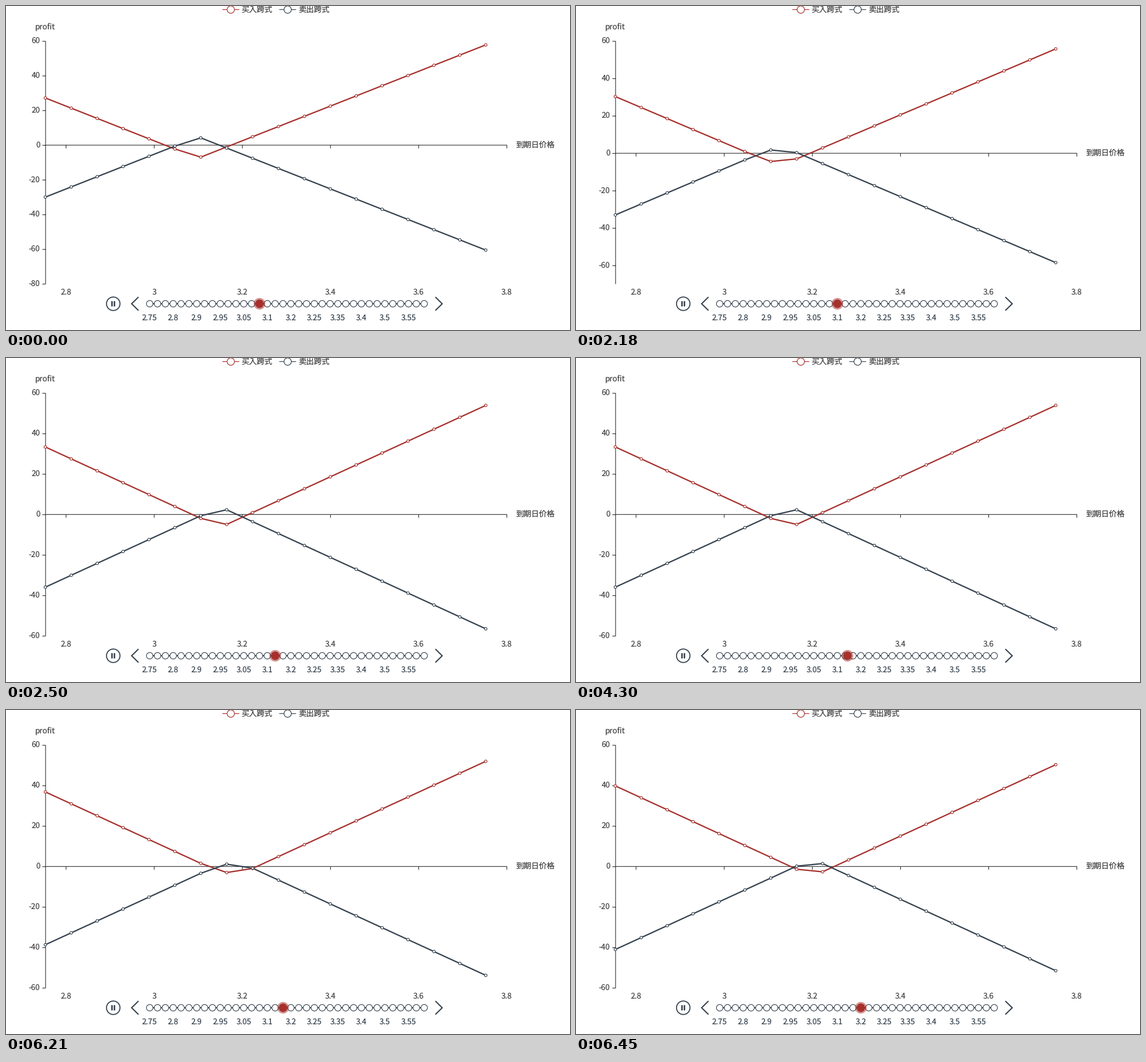
A matplotlib script for the animation above (8 s loop, 986 by 568 pixels).

```python
import numpy as np
import matplotlib.pyplot as plt
from matplotlib.animation import FuncAnimation
from matplotlib.patches import Circle

W, H, DPI = 986, 568, 64
PT = 72 / DPI                      # points per pixel
LOOP, STEP = 8000, 20              # ms
RED, NAVY, GREY, TEXT = "#a6302c", "#36424f", "#333333", "#444444"

LEFT, RIGHT, TOP, BOTTOM = 69.2, 876, 61.8, 487.5
TICK_X = 105 + 154.12 * np.arange(6)
N = 18
POINT_X = np.linspace(68.8, 838.7, N)
SLOPE = 100 / (N - 1)              # profit per point

TRACK_X, TRACK_Y, GAP, DOTS = 251.2, 522, 13.71, 36
FIRST = 14                         # slider index at the start

# axis minimum, then profit at both ends: long and short straddle
CHART_A = (-80, (27.3, 57.9), (-29.85, -60.4))
CHART_B = (-60, (33.45, 54.0), (-35.82, -56.4))
CHART_C = (-60, (39.9, 50.4), (-40.92, -51.4))
CHARTS = [CHART_A, CHART_A, CHART_B, CHART_B, CHART_C]

# moments of each slider move, and its progress at the first of them
MOVES = [
    ((240, 320, 400, 480), 0.28),
    ((2180, 2270, 2350, 2420, 2500), 0.19),
    ((4300, 4370, 4450), 0.45),
    ((6210, 6310, 6380, 6450), 0.228),
]

plt.rcParams["font.family"] = "Noto Sans CJK JP"
plt.rcParams["text.hinting"] = "none"

fig = plt.figure(figsize=(W / DPI, H / DPI), dpi=DPI, facecolor="white")
ax = fig.add_axes([0, 0, 1, 1])
ax.set_xlim(0, W)
ax.set_ylim(H, 0)
ax.axis("off")


def label(x, y, text, ha="center", color=TEXT):
    return ax.text(x, y, text, ha=ha, va="baseline", color=color,
                   fontsize=13.6 * PT, fontweight=350)


def stroke(xs, ys, color, width, z=2, **kw):
    return ax.plot(xs, ys, color=color, lw=width * PT, zorder=z,
                   snap=False, **kw)[0]


def disk(x, y, r, z=2, **kw):
    return ax.add_patch(Circle((x, y), r, zorder=z, **kw))


def ring(x, y, r, color, width, z=3):
    return disk(x, y, r, z, fc="white", ec=color, lw=width * PT)


def series(color, z):
    line = stroke(POINT_X, POINT_X, color, 2.3, z, solid_joinstyle="bevel")
    return line, [ring(x, 0, 2.3, color, 1.15, z + 0.5) for x in POINT_X]


def segments(segs):
    """Join (x0, y0, x1, y1) pieces into one broken line."""
    xs, ys = [], []
    for x0, y0, x1, y1 in segs:
        xs += [x0, x1, np.nan]
        ys += [y0, y1, np.nan]
    return xs, ys


def lerp(a, b, p):
    return a + (b - a) * p


def cubic_out(p):
    return 1 - (1 - p) ** 3


def quintic_in_out(p):
    return 16 * p ** 5 if p < 0.5 else 1 - 16 * (1 - p) ** 5


def y_pix(value, low):
    return TOP + (60 - value) * (BOTTOM - TOP) / (60 - low)


def curves(chart):
    """Pixel heights of the long and the short straddle."""
    low, (a, b), (c, d) = chart
    i = np.arange(N)
    down, up = SLOPE * i, SLOPE * (N - 1 - i)
    long_ = np.maximum(a - down, b - up)
    short = np.minimum(c + down, d + up)
    return y_pix(long_, low), y_pix(short, low)


def state(t):
    """Index of the current move and its linear progress."""
    for k, (times, p0) in enumerate(MOVES):
        done = sum(t >= s for s in times)
        if done < len(times):
            return k, np.linspace(p0, 1, len(times))[done - 1] if done else 0
    return len(MOVES) - 1, 1


# legend
for x, color, name in ((393, RED, "买入跨式"), (492.4, NAVY, "卖出跨式")):
    stroke([x - 14.2, x + 14.2], [6.3, 6.3], color, 1.2)
    ring(x, 6.3, 6.4, color, 1.2)
    label(x + 19, 11, name, "left")

# axes
label(68.7, 41, "profit")
for x, name in zip(TICK_X, ("2.8", "3", "3.2", "3.4", "3.6", "3.8")):
    label(x, 506, name)
axis_lines = stroke([], [], GREY, 1.15, solid_capstyle="butt")
axis_name = label(891.5, 0, "到期日价格", "left")
y_labels = {v: label(59.6, 0, str(v), "right") for v in range(-80, 61, 20)}

straddles = series(RED, 3), series(NAVY, 4)

# timeline
track = TRACK_X + GAP * np.arange(DOTS)
stroke(track[[0, -1]], [TRACK_Y, TRACK_Y], NAVY, 2)
for x in track:
    ring(x, TRACK_Y, 5.7, NAVY, 1.15)
names = "2.75 2.8 2.9 2.95 3.05 3.1 3.2 3.25 3.35 3.4 3.5 3.55".split()
for x, name in zip(track[::3], names):
    label(x, 551, name, color=NAVY)

ring(187.5, TRACK_Y, 11.8, NAVY, 1.8)
for x in (185.3, 189.6):
    stroke([x, x], [517.4, 526.6], NAVY, 2.6, 4, solid_capstyle="butt")
for tip, side in ((219.6, 12), (762.6, -12)):
    stroke([tip + side, tip, tip + side], [510.2, TRACK_Y, 533.8], NAVY, 2.1,
           solid_joinstyle="miter", solid_capstyle="butt")

halo = disk(0, TRACK_Y, 10.2, 5, fc=RED, alpha=0.5, lw=0)
knob = disk(0, TRACK_Y, 7.4, 6, fc=RED, lw=0)


def draw(n):
    k, p = state(n * STEP + STEP / 2)
    old, new = CHARTS[k], CHARTS[k + 1]
    e = cubic_out(p)

    def height(v):
        return lerp(y_pix(v, old[0]), y_pix(v, new[0]), e)

    low = new[0] if p else old[0]
    zero = height(0) - 0.3
    segs = [(LEFT, TOP, LEFT, BOTTOM), (LEFT, zero, RIGHT, zero)]
    segs += [(x, zero, x, zero + 5.7) for x in TICK_X]
    for v, text in y_labels.items():
        text.set_visible(v >= low)
        if v >= low:
            y = height(v)
            text.set_y(y + 3.3)
            segs.append((LEFT - 5.7, y, LEFT, y))
    axis_lines.set_data(*segments(segs))
    axis_name.set_y(zero + 3.5)

    for (line, marks), a, b in zip(straddles, curves(old), curves(new)):
        ys = lerp(a, b, e)
        line.set_ydata(ys)
        for mark, x, y in zip(marks, POINT_X, ys):
            mark.center = x, y

    x = TRACK_X + GAP * (FIRST + k + quintic_in_out(p))
    halo.center = knob.center = (x, TRACK_Y)
    return ()


anim = FuncAnimation(fig, draw, frames=LOOP // STEP, interval=STEP,
                     repeat=True, repeat_delay=0)
plt.show()
```
